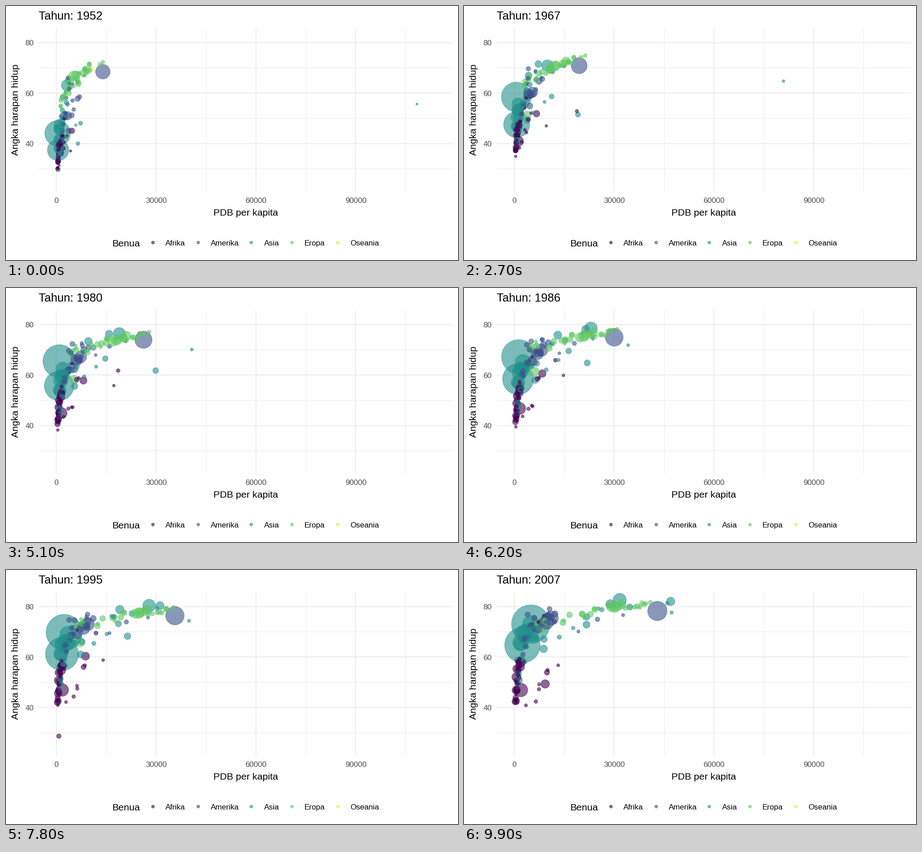
A matplotlib script for the animation above (10 s loop, 998 by 561 pixels).

```python
import numpy as np
import matplotlib.pyplot as plt
from matplotlib.animation import FuncAnimation
from matplotlib.colors import to_rgba

W, H, DPI = 998, 561, 100
FRAMES = 100
PX = 72 / DPI  # one pixel in points
AFR, AME, ASI, EUR, OCE = "Afrika", "Amerika", "Asia", "Eropa", "Oseania"
COLORS = {AFR: "#440154", AME: "#3B528B", ASI: "#21908C",
          EUR: "#5DC863", OCE: "#FDE725"}

plt.rcParams["font.family"] = "Liberation Sans"
rng = np.random.default_rng(12)
years = np.linspace(1952, 2007, FRAMES)
t = np.linspace(0, 1, FRAMES)


def to_x(gdp):
    return 111 + 7.347 * gdp


def to_y(life):
    return 526.5 - 5.575 * life


def bubble(group, pop, gdp, life):
    """Population in millions, GDP in thousands, life in years."""
    return group, to_x(gdp), to_y(life), 5 + 2.23 * np.sqrt(pop)


def path(group, pop, gdp, life):
    """A single bubble led through a few key years."""
    gdp, life = (np.interp(years, list(k), list(k.values())) for k in (gdp, life))
    return bubble(group, pop[0] + (pop[1] - pop[0]) * t, gdp, life)


def cloud(group, n, pop, growth, gdp0, gdp1, life0, life1,
          pace=1, ease=1.5, hump=0):
    """A seeded crowd; richer members also live longer."""
    crowd = []
    for q in (np.arange(n) + .5) / n:
        a, b, c, d = np.clip(q + rng.normal(0, .12, 4), 0, 1)
        g0 = gdp0[0] * (gdp0[1] / gdp0[0]) ** a
        g1 = gdp1[0] * (gdp1[1] / gdp1[0]) ** b
        l0 = life0[0] + (life0[1] - life0[0]) * c
        l1 = life1[0] + (life1[1] - life1[0]) * d
        p = pop[0] * (pop[1] / pop[0]) ** rng.random()
        gdp = g0 + (g1 - g0) * t ** pace
        life = l1 - (l1 - l0) * (1 - t) ** ease
        life = life + hump * rng.random() * np.sin(np.pi * t) ** 2
        crowd.append(bubble(group, p * (1 + (growth - 1) * t), gdp, life))
    return crowd


giants = [
    path(ASI, (556, 1319), {1952: .4, 1977: .74, 1992: 1.66, 2007: 4.96},
         {1952: 44, 1957: 50.5, 1962: 44.5, 1967: 58.4, 1972: 63.1, 2007: 73}),
    path(ASI, (372, 1110), {1952: .55, 1982: .86, 2007: 2.45},
         {1952: 37.4, 1977: 54.2, 1987: 58.6, 2007: 64.7}),
]
singles = [
    path(AME, (158, 301), {1952: 14, 1957: 14.9, 1977: 24.1, 2007: 43},
         {1952: 68.4, 1967: 70.8, 1977: 73.4, 2007: 78.2}),
    path(ASI, (86, 127), {1952: 3.2, 1962: 6.6, 1992: 26.8, 2007: 31.7},
         {1952: 63, 1972: 73.4, 1987: 78.7, 2007: 82.6}),
    path(ASI, (.16, 2.5), {1952: 108.4, 1957: 113.5, 1967: 80.9, 1972: 109.3,
                           1977: 59.3, 1982: 31.4, 2007: 47.3},
         {1952: 55.6, 1972: 67.7, 2007: 77.6}),
    path(ASI, (4, 27.6), {1952: 6.5, 1962: 11.6, 1977: 34.2, 1987: 21.2, 2007: 21.7},
         {1952: 39.9, 1982: 63, 2007: 72.8}),
    path(AFR, (1, 6), {1952: 2.4, 1962: 6.8, 1967: 18.8, 1977: 22, 1987: 11.8, 2007: 12.1},
         {1952: 42.7, 1987: 66.2, 2007: 74}),
    path(AFR, (.4, 1.5), {1952: 4.3, 1972: 11.4, 1977: 21.7, 1982: 15.1, 2007: 13.2},
         {1952: 37, 1987: 60.2, 2007: 56.7}),
    path(AFR, (14, 44), {1952: 4.7, 1977: 8, 2007: 9.3},
         {1952: 45, 1987: 60.8, 1997: 60.2, 2007: 49.3}),
    path(AFR, (33, 135), {1952: 1.1, 2007: 2}, {1952: 36.3, 1987: 46.9, 2007: 46.9}),
    path(AFR, (2.5, 8.9), {1952: .5, 2007: .86},
         {1952: 40, 1987: 44, 1992: 23.6, 2007: 46.2}),
    path(EUR, (22, 71), {1952: 2, 2007: 8.5}, {1952: 43.6, 2007: 71.8}),
]
oceania = cloud(OCE, 2, (4, 13), 2.2, (10, 10.6), (25, 34.4), (69.1, 69.4),
                (80.2, 81.2), ease=1)
crowd = [
    # Europe: large west, small west, middle, east
    *cloud(EUR, 5, (30, 70), 1.25, (4, 10), (28.6, 33), (65, 69.5), (79.4, 80.8), ease=1.1),
    *cloud(EUR, 9, (3, 10), 1.25, (6, 14), (33, 42), (67, 72.7), (79, 81.7), ease=1),
    *cloud(EUR, 9, (3, 20), 1.2, (3.2, 7), (14, 28), (60, 66.5), (73.5, 79.5)),
    *cloud(EUR, 6, (.5, 15), 1.4, (1, 3.6), (6, 10.8), (54, 61), (72.5, 76), ease=1.8),
    # Americas: large, medium, rich, small
    *cloud(AME, 2, (40, 57), 3.3, (2.1, 3.5), (9.1, 12), (50.8, 51), (72.4, 76.2)),
    *cloud(AME, 5, (4, 15), 2.8, (3.5, 7.7), (7, 13), (45, 62), (71, 78)),
    *cloud(AME, 3, (.7, 15), 2, (3, 11.4), (18, 36.3), (60, 69), (70, 80.7)),
    *cloud(AME, 14, (1, 5), 2.8, (1.4, 5), (1.8, 10.6), (38, 66), (61, 79)),
    # Asia: large, fast growing, oil, small
    *cloud(ASI, 7, (20, 82), 2.9, (.6, 1), (1.8, 5), (36, 48), (63, 74), pace=2, ease=1.2),
    *cloud(ASI, 6, (1, 20), 2.7, (1, 4), (22, 47), (47, 65), (78.5, 82), pace=1.9),
    *cloud(ASI, 4, (.3, 10), 4, (2, 10), (8, 29), (40, 51), (62, 76)),
    *cloud(ASI, 11, (1.3, 9), 2.9, (.5, 3), (1, 10), (29, 57), (48, 74)),
    # Africa: north and islands, middle income, large, small
    *cloud(AFR, 6, (.4, 22), 3.4, (1.4, 2.7), (3.8, 11), (42, 53), (71, 76), ease=1.3),
    *cloud(AFR, 6, (.3, 4), 3.3, (.5, 3.5), (3.5, 12.5), (30, 47), (40, 55), hump=10),
    *cloud(AFR, 8, (6, 20), 3.6, (.4, 1.1), (.3, 2), (31, 42), (42, 58), hump=3),
    *cloud(AFR, 27, (.3, 6), 3.4, (.4, 2), (.4, 2.2), (30, 43), (42, 60), hump=4),
]
rng.shuffle(crowd)
groups, xs, ys, sizes = zip(*giants, *oceania, *singles, *crowd)
xs, ys, sizes = map(np.array, (xs, ys, sizes))

fig = plt.figure(figsize=(W / DPI, H / DPI), dpi=DPI, facecolor="white")
ax = fig.add_axes([0, 0, 1, 1])
ax.set(xlim=(0, W), ylim=(H, 0))
ax.axis("off")


def label(x, y, text, px, color="black", **kw):
    return ax.text(x, y, text, fontsize=px * PX, color=color, va="baseline", **kw)


def area(diameter):
    return ((diameter - 1) * PX) ** 2


def dots(x, y, diameter, names):
    shade = [to_rgba(COLORS[n], .6) for n in names]
    return ax.scatter(x, y, s=area(diameter), facecolors=shade,
                      edgecolors=shade, linewidths=PX, zorder=3)


def grid(gdps, lifes, width):
    style = dict(colors="#EBEBEB", linewidths=width * PX, zorder=1)
    ax.vlines([to_x(g) for g in gdps], 49, 410, **style)
    ax.hlines([to_y(v) for v in lifes], 72, 987, **style)


grid(range(15, 106, 30), (30, 50, 70), 1)
grid(range(0, 91, 30), (40, 60, 80), 1.8)
for g in range(0, 91, 30):
    label(to_x(g), 434.5, str(g * 1000), 17.07, "#4D4D4D", ha="center")
for v in (40, 60, 80):
    label(61.5, to_y(v) + 6.5, str(v), 17.07, "#4D4D4D", ha="right")
label(529.5, 463, "PDB per kapita", 21.3, ha="center")
label(27.5, 229.5, "Angka harapan hidup", 21.3, ha="center",
      rotation=90, rotation_mode="anchor")
title = label(72, 30, "", 25.6)

label(234, 531, "Benua", 21.3)
for name, dot_x, text_x in ((AFR, 324.5, 352), (AME, 424, 452), (ASI, 541.5, 570),
                            (EUR, 631, 659), (OCE, 732, 760)):
    dots([dot_x], [521.5], 7.5, [name])
    label(text_x, 529, name, 17.07)

points = dots(xs[:, 0], ys[:, 0], sizes[:, 0], groups)


def update(i):
    title.set_text(f"Tahun: {round(years[i])}")
    points.set_offsets(np.column_stack((xs[:, i], ys[:, i])))
    points.set_sizes(area(sizes[:, i]))
    return title, points


anim = FuncAnimation(fig, update, frames=FRAMES, interval=100,
                     repeat=True, repeat_delay=0, blit=False)
plt.show()
```
